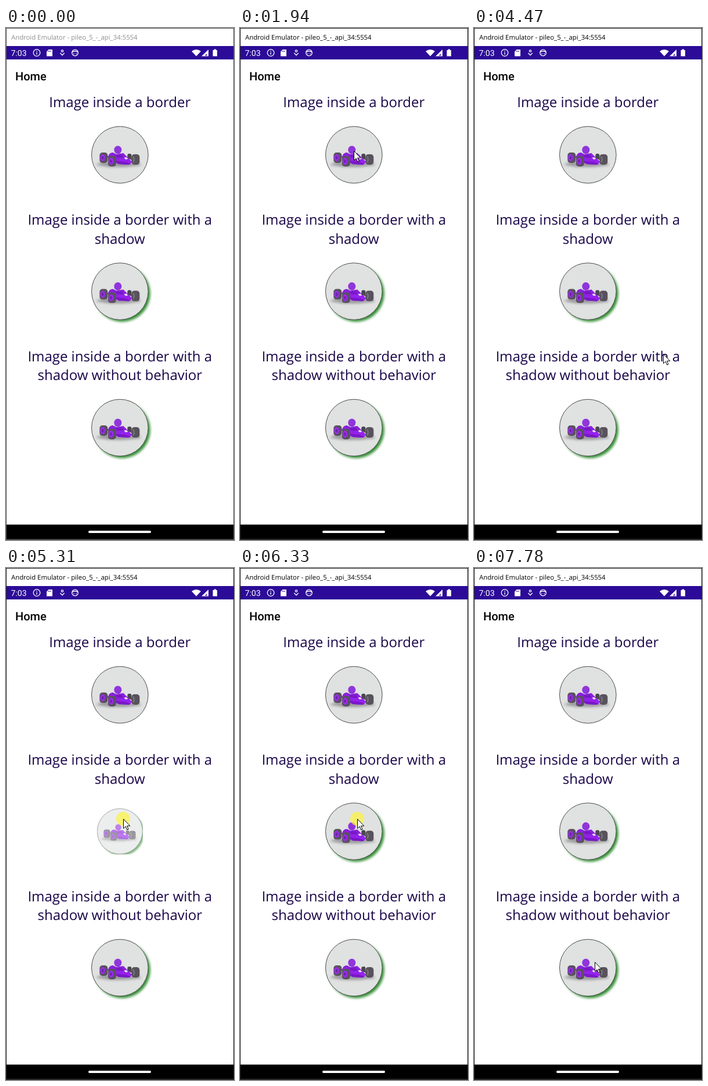
These frames come from a looping animation (393 by 880 pixels, 8 s). An HTML page:

```html
<!DOCTYPE html>
<html lang="en">
<head>
<meta charset="utf-8">
<title>Image touch demo</title>
<style>
  html, body { margin: 0; width: 100%; height: 100%; overflow: hidden; background: #fff; }
  svg { display: block; }
  text { text-rendering: geometricPrecision; }
  .head { font: 24px "Open Sans", sans-serif; fill: #190649; text-anchor: middle; }
  .ui { font: 14px Roboto, sans-serif; }
</style>
</head>
<body>
<svg width="393" height="880" viewBox="0 0 393 880">
  <defs>
    <filter id="blur" x="-20%" y="-20%" width="140%" height="140%"><feGaussianBlur stdDeviation="2.2"/></filter>
    <filter id="soft" x="-20%" y="-50%" width="140%" height="200%"><feGaussianBlur stdDeviation="2"/></filter>
    <clipPath id="box"><rect x="-49.5" y="-49.5" width="99" height="99"/></clipPath>
    <linearGradient id="paint" x2="0" y2="1">
      <stop offset="0" stop-color="#8420d6"/><stop offset="1" stop-color="#9f22fa"/>
    </linearGradient>
    <g id="wheel">
      <rect x="-7" y="-9" width="14" height="18" rx="5" fill="#57525b"/>
      <ellipse cx="-1.800" rx="4.200" ry="6.200" fill="#9a2bea"/>
      <ellipse cx="-1.800" rx="1.700" ry="2.800" fill="#6a22a8"/>
    </g>
    <g id="car">
      <path d="M-42 17L-30 12 34 14 36 18 8 21 -18 21Z" fill="#7d7b80" opacity=".7" filter="url(#soft)"/>
      <rect x="13" y="-2" width="7" height="9" rx="3" fill="#4a464d"/>
      <path d="M14 5L24 9M-22 3L-12 8M14 13L24 11" stroke="#4a464d" stroke-width="2"/>
      <use href="#wheel" x="-28" y="5"/>
      <ellipse cx="-3.500" cy="-8.500" rx="6.500" ry="7" fill="#8f35da"/>
      <path d="M-20 2Q-18 -4 -12 -4L-6 -1 6 -3 13 4 19 10Q21 15 16 17L-2 16 -9 13 -20 10Z" fill="url(#paint)"/>
      <path d="M-10 10L10 12 18 15 15 17 -2 16Z" fill="#7a18c8"/>
      <path d="M-9 1L3 0 7 5 -4 5Z" fill="#7718c4"/>
      <path d="M7 5l4-1 3 3-4 1z" fill="#eee6f5"/>
      <use href="#wheel" x="-13.500" y="11"/>
      <rect x="20" y="-1" width="14" height="18" rx="5" fill="#57525b"/>
      <path d="M23 3Q26 8 23 13" fill="none" stroke="#7d7882" stroke-width="2"/>
    </g>
    <g id="disc">
      <circle r="48.800" fill="#e0e1e1" stroke="#4b4b4e"/>
      <use href="#car"/>
    </g>
  </defs>

  <rect width="393" height="880" fill="#fff"/>
  <text id="title" x="9" y="20" font-family="Open Sans, sans-serif" font-size="11.35">Android Emulator - pileo_5_-_api_34:5554</text>

  <rect y="31" width="393" height="23" fill="#2b0b98"/>
  <text class="ui" x="8.500" y="48" fill="#fff">7:03</text>
  <g fill="none" stroke="#fff" stroke-width="1.300">
    <circle cx="53" cy="42.500" r="5.800"/>
    <path d="M53 41.700v4M53 39v1.400"/>
    <circle cx="119" cy="42.500" r="5.300"/>
    <path d="M114 41.500Q119 38 124 41.500M117 43.500v1.400M121 43.500v1.400"/>
    <circle cx="97" cy="39.500" r="1.700"/>
    <path d="M93.300 43L97 46.800 100.700 43"/>
  </g>
  <g fill="#fff">
    <path d="M73.500 37H80v11.500H70V40.500Z"/>
    <path d="M320 40Q328 34 336 40L328 48.500Z"/>
    <path d="M349 37V48.500H337Z"/>
    <path d="M356.500 38h2v-1.500h3.500V38h2v10.500h-7.500z"/>
  </g>
  <path d="M73 39v2M75 39v2M77 39v2" stroke="#2b0b98"/>
  <path d="M343 47.500L346 44v3.500z" fill="#2b0b98"/>

  <text x="16" y="90" font-family="Roboto, sans-serif" font-size="20" font-weight="500">Home</text>
  <g class="head">
    <text x="196.300" y="136">Image inside a border</text>
    <text x="196.300" y="338">Image inside a border with a</text>
    <text x="196.300" y="371">shadow</text>
    <text x="196.300" y="572.500">Image inside a border with a</text>
    <text x="196.300" y="605">shadow without behavior</text>
  </g>
  <g id="cards"></g>

  <g id="toast">
    <rect x="122" y="765" width="148" height="43" rx="21.500" fill="#6b6870" opacity=".45" filter="url(#soft)"/>
    <rect x="121" y="762" width="150" height="44" rx="22" fill="#f8f5fe"/>
    <circle cx="149" cy="784" r="11.700" fill="#512bd4"/>
    <text class="ui" x="171" y="789" fill="#2b282f">Image clicked</text>
  </g>

  <rect y="853.500" width="393" height="24.500" fill="#000"/>
  <rect x="142" y="864" width="108" height="4" rx="2" fill="#fff"/>
  <path d="M0 878.500H393" stroke="#333"/>
  <rect id="frame" x=".5" y=".5" width="392" height="879" fill="none"/>

  <g id="cursor">
    <circle id="glow" r="12" fill="#fdf33c" fill-opacity=".7"/>
    <path d="M.500 .500V16.600L4.200 13.200 6.700 19 9.100 18 6.600 12.300H11.800Z" fill="#fff" stroke="#000"/>
  </g>
</svg>
<script>
const LOOP = 8000;
const $ = id => document.getElementById(id);

// Pointer moves: start, end, steps, from, bend, to
const moves = [
  [110, 790, 11, [332, 805], [285, 480], [197, 193]],
  [1270, 1410, 3, [197, 193], [196, 202], [196, 211]],
  [2550, 3250, 11, [196, 211], [372, 540], [190, 798]],
  [3380, 3380, 1, [190, 798], [200, 798], [213, 797]],
  [3450, 3720, 4, [213, 797], [222, 797], [230, 796]],
  [4050, 4540, 8, [230, 796], [412, 690], [319, 548]],
  [4740, 5090, 6, [319, 548], [262, 485], [202, 431]],
  [6960, 7510, 9, [202, 431], [386, 610], [281, 692]],
  [7580, 7780, 4, [281, 692], [244, 686], [208, 677]]
];

// Press poses: [scale, opacity, glow]
const poses = {
  rest: [1, 1, 0], touch: [1, 1, 1], sink: [.92, .8, 1],
  down: [.8, .6, 1], rise: [.92, .8, 0]
};
const presses = [
  [0, 'rest'],
  [1610, 'touch'], [1680, 'down'], [1870, 'rise'], [1940, 'rest'],
  [5240, 'touch'], [5310, 'down'], [5380, 'rise'], [5450, 'rest'],
  [5910, 'touch'], [5980, 'down'], [6050, 'rise'],
  [6120, 'touch'], [6190, 'down'], [6260, 'rise'],
  [6330, 'touch'], [6400, 'down'], [6470, 'rise'], [6540, 'rest'],
  [6610, 'touch'], [6680, 'sink'], [6750, 'down'], [6820, 'rise'], [6890, 'rest']
];

const shadow = '<circle cx="3.7" cy="3.7" r="48.5" fill="#08780f" opacity=".85" filter="url(#blur)"/>';
$('cards').innerHTML = [218, 452.6, 687].map((y, i) =>
  `<g transform="translate(196.3 ${y})"><g>${i ? shadow : ''}<use href="#disc"/></g></g>`).join('');
const cards = [...$('cards').children].map(g => g.firstChild);

const latest = (table, t) => table.filter(row => row[0] <= t).pop();

// Fraction done after each held step
function stepped(t, t0, t1, n) {
  if (t < t0) return 0;
  const gap = (t1 - t0) / (n - 1) || 1;
  return (Math.min(n - 1, Math.floor((t - t0) / gap + 1e-6)) + 1) / n;
}

function pointer(t) {
  const move = latest(moves, t);
  if (!move) return null;
  const [t0, t1, n, a, b, c] = move;
  const p = stepped(t, t0, t1, n), e = p * p * (3 - 2 * p), r = 1 - e;
  return a.map((v, i) => r * r * v + 2 * r * e * b[i] + e * e * c[i]);
}

function setCard(card, [scale, alpha]) {
  card.setAttribute('transform', `scale(${scale})`);
  card.setAttribute('opacity', alpha);
  if (scale < 1) card.setAttribute('clip-path', 'url(#box)');
  else card.removeAttribute('clip-path');
}

function render(t) {
  const active = t >= 1610;
  $('title').setAttribute('fill', active ? '#000' : '#8e8e8e');
  $('frame').setAttribute('stroke', active ? '#1c1c1c' : '#4c4c4c');

  const pose = poses[latest(presses, t)[1]];
  setCard(cards[0], t < 4000 ? pose : poses.rest);
  setCard(cards[1], t < 4000 ? poses.rest : pose);

  $('toast').setAttribute('opacity', stepped(t, 2140, 2350, 4) - stepped(t, 4050, 4260, 4));

  const tip = pointer(t);
  $('cursor').setAttribute('visibility', tip ? 'visible' : 'hidden');
  if (tip) $('cursor').setAttribute('transform', `translate(${tip.map(Math.round)})`);
  $('glow').setAttribute('opacity', pose[2]);
}

const start = performance.now();
function tick() {
  render((performance.now() - start) % LOOP);
  requestAnimationFrame(tick);
}
tick();
</script>
</body>
</html>
```
